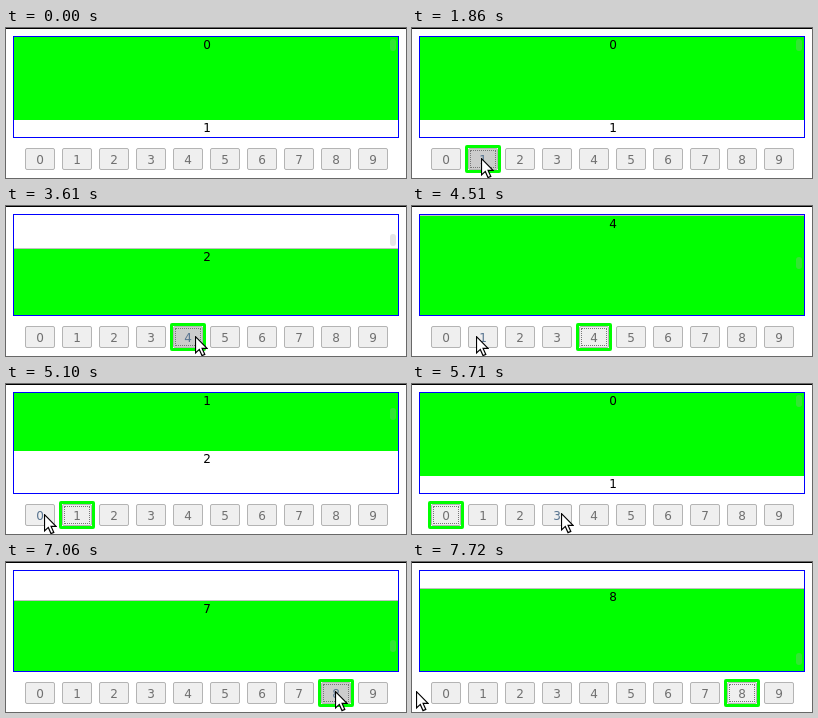
An HTML page for the animation above (7820 ms loop, 400x150 px).

```html
<!DOCTYPE html>
<html>
<head>
<meta charset="utf-8">
<style>
html, body { margin: 0; width: 100%; height: 100%; overflow: hidden; background: #fff; }
body { position: relative; font: 12px/14px "DejaVu Sans", sans-serif; text-align: center; }
div, svg { position: absolute; box-sizing: border-box; }
#rule { left: 0; top: 0; width: 400px; height: 1px; background: #000; }
#view { left: 7px; top: 8px; width: 386px; height: 102px; border: 1px solid #00f; overflow: hidden; }
#list { left: 0; top: 0; width: 100%; }
.item { left: 0; width: 100%; border-bottom: 1px solid #c0c0c0; color: #000; padding: 1px 0 0 2px; }
.item.on { background: #0f0; border-color: #0f0; }
#thumb { left: 376px; width: 6px; height: 12px; border-radius: 3px; background: rgba(170, 170, 170, .3); }
.btn { top: 120px; width: 30px; height: 22px; border: 1px solid #b4b4b4; border-radius: 2px;
  background: #efefef; color: #707070; line-height: 22.5px; }
.btn.hover { color: #587490; }
.btn.focus::before, .btn.focus::after { content: ""; position: absolute; }
.btn.focus::before { inset: -4px; border: 3px solid #0f0; border-radius: 2px; }
.btn.focus::after { inset: 1px; border: 1px dotted #777; }
.btn.down { background: #ccc; }
#cursor { left: 0; top: 0; }
</style>
</head>
<body>
<div id="rule"></div>
<div id="view"><div id="list"></div><div id="thumb"></div></div>
<svg id="cursor" width="13" height="21">
  <path d="M.5.7V17l3.8-3.6 2.7 6.2 2.8-1.2-2.7-6h5z" fill="#fff" stroke="#000" stroke-width="1.2"/>
</svg>
<script>
const LOOP = 7820, VIEW = 100, LEFT = 19, STEP = 37;
const HOLD = 120, REST = 150; // ms a button is held, ms of rest before a press
const heights = [83, 58, 66, 48, 99, 50, 54, 70, 82, 30];
// Presses as time, x, y; the last stop lies beyond the buttons.
const stops = [[910, 36, 130], [1860, 69, 130], [2670, 111, 128], [3610, 189, 130], [4620, 64, 130],
  [5250, 38, 130], [6350, 292, 128], [6990, 329, 129], [LOOP + 50, 4, 129]];

const $ = id => document.getElementById(id);
const list = $("list"), thumb = $("thumb"), cursor = $("cursor");
const buttonAt = x => Math.floor((x - LEFT) / STEP);

function add(parent, cls, text, style) {
  const el = document.createElement("div");
  el.className = cls;
  el.textContent = text;
  Object.assign(el.style, style);
  parent.append(el);
  return el;
}

let total = 0;
const tops = heights.map(h => (total += h) - h);
const items = heights.map((h, i) => add(list, "item", i, { top: tops[i] + "px", height: h + "px" }));
const buttons = heights.map((h, i) => add(document.body, "btn", i, { left: LEFT + STEP * i + "px" }));
document.body.append(cursor);

// Glide to the next stop; longer ways take more time.
function pointer(t) {
  const next = Math.max(1, stops.findIndex(s => t < s[0]));
  const [t0, x0, y0] = stops[next - 1], [t1, x1, y1] = stops[next];
  const arrive = t1 - REST;
  const leave = Math.max(t0 + HOLD + 40, arrive - 45 * Math.sqrt(Math.abs(x1 - x0)));
  const k = Math.min(1, Math.max(0, (t - leave) / (arrive - leave)));
  const eased = 1 - (1 - k) ** 1.5;
  return [Math.round(x0 + (x1 - x0) * eased), Math.round(y0 + (y1 - y0) * eased)];
}

function draw(t) {
  let active = 0, focus = -1, down = -1, scroll = 0;
  for (const [press, x] of stops) {
    if (t < press) break;
    focus = buttonAt(x);
    if (t < press + HOLD) { down = focus; break; }
    active = focus;
    // smallest scroll that shows the whole item
    scroll = Math.min(tops[active], Math.max(scroll, tops[active] + heights[active] - VIEW));
  }
  const [x, y] = pointer(t);
  const shown = t >= stops[0][0];
  const hover = shown ? buttonAt(x - 2) : -1;
  items.forEach((el, i) => el.classList.toggle("on", i === active));
  buttons.forEach((el, i) => {
    el.classList.toggle("hover", i === hover);
    el.classList.toggle("focus", i === focus);
    el.classList.toggle("down", i === down);
  });
  list.style.top = -scroll + "px";
  thumb.style.top = 2 + Math.round(scroll * VIEW / total) + "px";
  cursor.style.transform = `translate(${x}px, ${y}px)`;
  cursor.style.visibility = shown ? "visible" : "hidden";
}

const start = performance.now();
function tick() {
  draw((performance.now() - start) % LOOP);
  requestAnimationFrame(tick);
}
tick();
</script>
</body>
</html>
```
